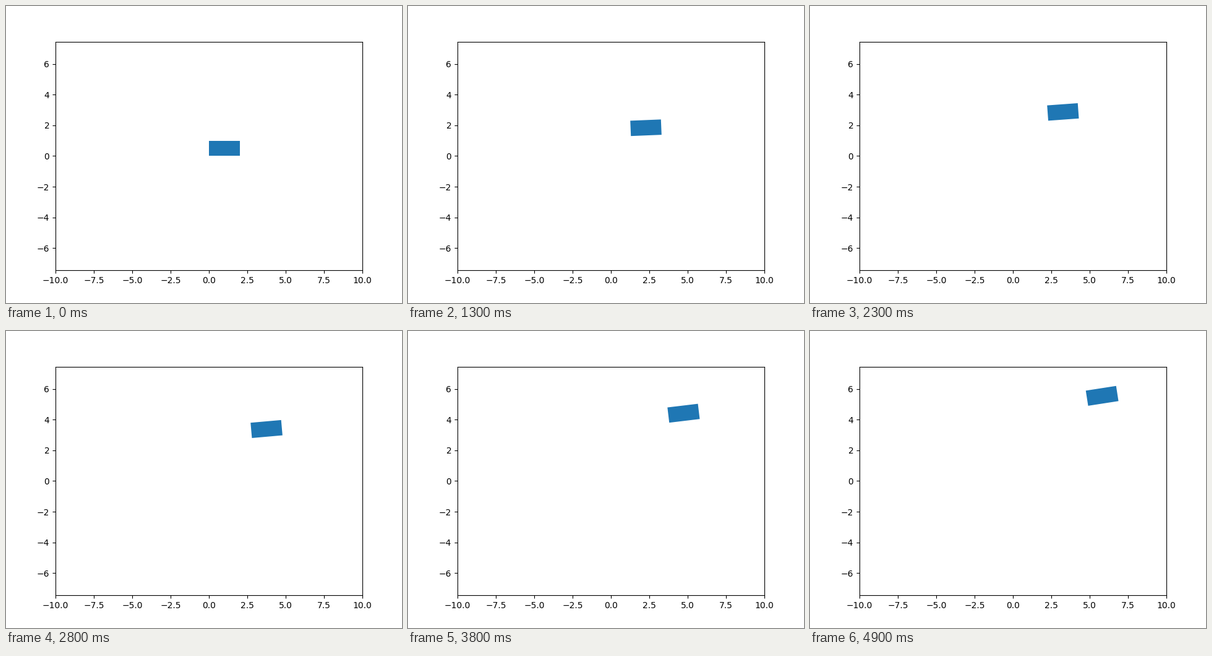
A matplotlib script that plays this animation: 640 px wide and 480 px high, repeating every 5000 ms.

```python
import matplotlib.pyplot as plt
from matplotlib.animation import FuncAnimation
from matplotlib.patches import Rectangle

FRAMES = 50
INTERVAL = 100
STEP = 0.1     # data units per frame, along both axes
TURN = 0.18    # degrees per frame

fig, ax = plt.subplots(figsize=(6.4, 4.8), dpi=100)
half_height = 10 * (0.77 * 480) / (0.775 * 640)  # equal scale on both axes
ax.set_xlim(-10, 10)
ax.set_ylim(-half_height, half_height)

box = ax.add_patch(Rectangle((0, 0), 2, 1, facecolor="C0"))


def update(frame):
    box.set_xy((STEP * frame, STEP * frame))
    box.set_angle(TURN * frame)
    return (box,)


anim = FuncAnimation(fig, update, frames=FRAMES, interval=INTERVAL,
                     repeat=True, repeat_delay=0)
plt.show()
```
